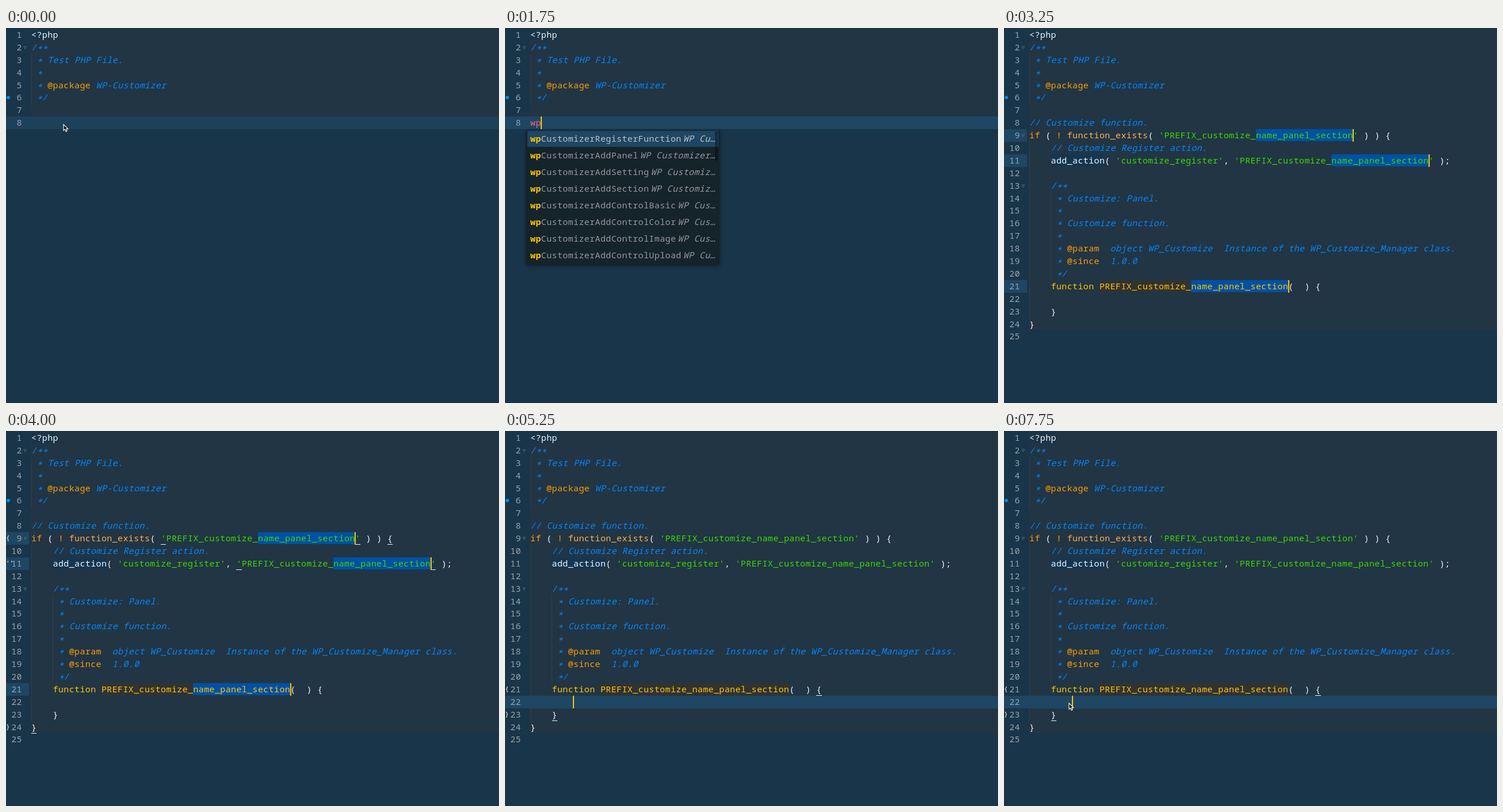
Recreate the animation shown at these times as an HTML page. Size 857 by 653 pixels, loop 8000 ms.

```html
<!DOCTYPE html>
<html lang="en">
<head>
<meta charset="utf-8">
<title>Snippet completion</title>
<style>
html, body { margin: 0; width: 100%; height: 100%; overflow: hidden; background: #193549; }
#stage { position: relative; width: 857px; height: 653px; overflow: hidden; background: #193549;
  font: 500 15px/22px "Noto Sans Mono", "DejaVu Sans Mono", monospace; letter-spacing: .38px; color: #f4f6f7; }
#stage div, #stage svg { position: absolute; }
.text { white-space: pre; height: 22px; }
.num { color: #99a5ad; }
.mark { font-size: 11px; letter-spacing: 0; color: #fff; }
.com { color: #0088ff; font-style: italic; }
.star { position: relative; top: 3px; }
.key { color: #ff9d00; }
.lib { color: #ffb054; }
.str { color: #3ad900; }
.fun { color: #ffc600; }
.raw { color: #ff628c; }
.item { color: #95999b; }
.on { color: #bcc4c9; }
.item b { color: #ffc600; }
.popup { background: #15232b; box-shadow: 0 2px 7px rgba(0, 0, 0, .45); }
</style>
</head>
<body>
<div id="stage"></div>
<script>
const LOOP = 8000, CHAR = 9.38, ROW = 21.9, LEFT = 44;
const stage = document.getElementById('stage');

const com = s => [['com', s]];
const HEAD = [
  [['', '<?php']],
  com('/**'),
  com(' * Test PHP File.'),
  com(' *'),
  [['com', ' * '], ['key', '@package'], ['com', ' WP-Customizer']],
  com(' */'),
  []
];
const NAME = 'PREFIX_customize_name_panel_section';
const CODE = [
  ...HEAD,
  com('// Customize function.'),
  [['key', 'if'], ['', ' ( '], ['key', '!'], ['', ' '], ['lib', 'function_exists'], ['', '( '],
    ['str', `'${NAME}'`], ['', ' ) ) {']],
  com('    // Customize Register action.'),
  [['', '    add_action( '], ['str', "'customize_register'"], ['', ', '], ['str', `'${NAME}'`], ['', ' );']],
  [],
  com('    /**'),
  com('     * Customize: Panel.'),
  com('     *'),
  com('     * Customize function.'),
  com('     *'),
  [['com', '     * '], ['key', '@param'], ['com', '  object WP_Customize  Instance of the WP_Customize_Manager class.']],
  [['com', '     * '], ['key', '@since'], ['com', '  1.0.0']],
  com('     */'),
  [['fun', '    function ' + NAME], ['', '(  ) {']],
  [],
  [['', '    }']],
  [['', '}']],
  []
];

// Menu rows: name, hint
const WORDS = [['while', 'while …'], ['widget', 'Widget Template'], ['widget', 'Widget Template'],
  ['wordwrap'], ['wpdb'], ['wp'], ['wpautop'], ['wptexturize']];
const SNIPPETS = ['RegisterFunction', 'AddPanel', 'AddSetting', 'AddSection', 'AddControlBasic',
  'AddControlColor', 'AddControlImage', 'AddControlUpload'].map(s => {
  const name = 'wpCustomizer' + s;
  return [name, 'WP Customizer: Theme'.slice(0, 33 - name.length) + '…'];
});

// Matched brackets: [line, column]; gutter marks: [line, sign]
const OUTER = { under: [[9, 24], [9, 60], [9, 66], [11, 38], [11, 74], [24, 0]], marks: [[9, '{'], [11, '‘’'], [24, '}']] };
const INNER = { under: [[21, 53], [23, 4]], marks: [[21, '{'], [23, '}']] };

const typed = (word, menu) => ({ line: 8, word, menu, carets: [[8, word.length]], alpha: 1 });
const start = { line: 8, word: '', carets: [[8, 0]] };
const fill = { full: 1, picks: [[9, 42], [11, 56], [21, 30]], carets: [[9, 60], [11, 74], [21, 48]] };
const body = { full: 1, line: 22, carets: [[22, 8]] };
const end = { full: 1, line: 25, carets: [[25, 0]] };

const STEPS = [
  [0, { ...start, alpha: 0, band: '#1d405b', mouse: [100, 168] }],
  [250, { ...start, alpha: 0 }],
  [500, { ...start, alpha: .5 }],
  [750, { ...start, alpha: 1 }],
  [1250, typed('w', WORDS)],
  [1500, typed('wp', WORDS.slice(4))],
  [1750, typed('wp', SNIPPETS)],
  [2250, typed('wpc', SNIPPETS)],
  [2500, typed('wpcu', SNIPPETS)],
  [2750, typed('wpcur', SNIPPETS)],
  [3000, typed('wpcure', SNIPPETS)],
  [3250, { ...fill, alpha: 1 }],
  [3500, { ...fill, alpha: .6, match: OUTER }],
  [3750, { ...fill, alpha: .2, match: OUTER }],
  [4000, { ...fill, alpha: 1, match: OUTER }],
  [4250, { ...fill, alpha: .6, match: OUTER }],
  [4500, { ...fill, alpha: 0, match: OUTER }],
  [4750, { ...body, alpha: 1 }],
  [5000, { ...body, alpha: 1, match: INNER }],
  [5750, { ...body, alpha: .5, match: INNER }],
  [6000, { ...end, alpha: 1 }],
  [6500, { ...end, alpha: .6 }],
  [6750, { ...end, alpha: 0 }],
  [7000, { ...end, alpha: .6 }],
  [7250, { ...end, alpha: 1, mouse: [126, 490] }],
  [7500, { ...body, alpha: 1, mouse: [113, 474] }],
  [7750, { ...body, alpha: 1, match: INNER, mouse: [113, 474] }]
];

const colX = c => LEFT + c * CHAR;
const rowY = n => Math.round(.9 + (n - 1) * ROW);
const esc = s => s.replace(/</g, '&lt;').replace(/\*/g, '<span class="star">*</span>');
const box = (x, y, w, h, color, extra = '') =>
  `<div style="left:${x}px;top:${y}px;width:${w}px;height:${h}px;background:${color};${extra}"></div>`;
const text = (x, y, html, cls = '', side = 'left') =>
  `<div class="text ${cls}" style="${side}:${side === 'left' ? x : 857 - x}px;top:${y - 1}px">${html}</div>`;
const spans = parts => parts.map(([cls, s]) => `<span class="${cls}">${esc(s)}</span>`).join('');
const guide = (col, from, to) => box(Math.floor(colX(col)), rowY(from), 1, rowY(to + 1) - rowY(from), '#2f404c');
const shade = (n, col, chars, color) => box(colX(col), rowY(n), chars * CHAR, 21, color);

function emphasize(name, word) {
  const head = Math.min(word.length, 4);
  let rest = name.slice(head);
  if (word.length === 5) rest = rest.replace('r', '<b>r</b>');
  if (word.length === 6) rest = rest.replace(rest.includes('Re') ? 'Re' : 'er', '<b>$&</b>');
  return `<b>${name.slice(0, head)}</b>${rest}`;
}

function menuHtml(rows, word) {
  const wide = rows === SNIPPETS, right = wide ? 373 : 276;
  const hintEnd = right - 7;
  let out = `<div class="popup" style="left:37px;top:178px;width:${right - 37}px;height:${rows.length * 29 + 2}px"></div>`;
  out += box(39, 179, right - 41, 28, '#1f4662');
  out += box(right - 8, 180, 5, wide ? 51 : 27, 'rgba(0,0,0,.35)');
  rows.forEach(([name, hint], i) => {
    const y = 182 + i * 29, cls = i ? 'item' : 'item on';
    out += text(LEFT, y, emphasize(name, word), cls);
    if (hint) out += text(hintEnd, y, `<i>${hint}</i>`, cls, 'right');
  });
  return out;
}

function mouseHtml([x, y]) {
  return `<svg style="left:${x - 1}px;top:${y - 1}px" width="12" height="16" viewBox="-1 -1 12 16">
    <path d="M0 0V10.6L2.5 8.4L4.3 12.3L6.2 11.5L4.5 7.7H7.8Z" fill="#111" stroke="#fff" stroke-width="1.1"/></svg>`;
}

function paint(s) {
  const lines = s.full ? CODE : [...HEAD, [['raw', s.word]]];
  const codeEnd = rowY(s.full ? 25 : 8);
  let out = box(43, 0, 814, codeEnd, '#223544') + box(0, 0, 857, 1, '#1c2f3e');
  if (s.line) out += box(0, rowY(s.line), 857, 22, s.band || '#1f4662');
  out += shade(1, 0, 5, '#193549') + guide(0, 3, 6);

  if (s.full) {
    out += guide(0, 10, 21) + guide(0, 23, 23) + guide(4, 14, 20);
    if (s.line !== 22) out += guide(0, 22, 22);
    out += shade(11, 4, 10, '#153651') + shade(21, 13, 35, '#323233');
  }
  for (const [n, c] of s.picks || []) {
    out += box(0, rowY(n), 40, 22, '#1f4662') + shade(n, c, 18, '#0050a4');
  }

  lines.forEach((parts, i) => {
    const y = rowY(i + 1);
    out += text(28, y, i + 1, 'num', 'right') + text(LEFT, y, spans(parts));
  });
  for (const n of s.full ? [2, 9, 13] : [2]) {
    out += `<svg style="left:30px;top:${rowY(n) + 8}px" width="7" height="7">
      <path d="M1 1H5.6L3.3 5.4Z" fill="none" stroke="#53646f"/></svg>`;
  }
  out += box(1, 118, 6, 6, '#0088ff', 'border-radius:50%');

  if (s.match) {
    for (const [n, c] of s.match.under) out += box(colX(c), rowY(n) + 21, CHAR, 1, '#f4f6f7');
    for (const [n, sign] of s.match.marks) out += text(0, rowY(n), sign, 'mark');
  }
  if (s.menu) out += menuHtml(s.menu, s.word);
  for (const [n, c] of s.carets) {
    out += box(Math.round(colX(c) - .6), rowY(n), 2, 22, '#ffc600', `opacity:${s.alpha}`);
  }
  if (s.mouse) out += mouseHtml(s.mouse);
  stage.innerHTML = out;
}

let shown = -1;
const began = performance.now();
function tick() {
  const t = (performance.now() - began) % LOOP;
  const at = STEPS.filter(([from]) => from <= t).length - 1;
  if (at !== shown) paint(STEPS[shown = at][1]);
  requestAnimationFrame(tick);
}
tick();
</script>
</body>
</html>
```
